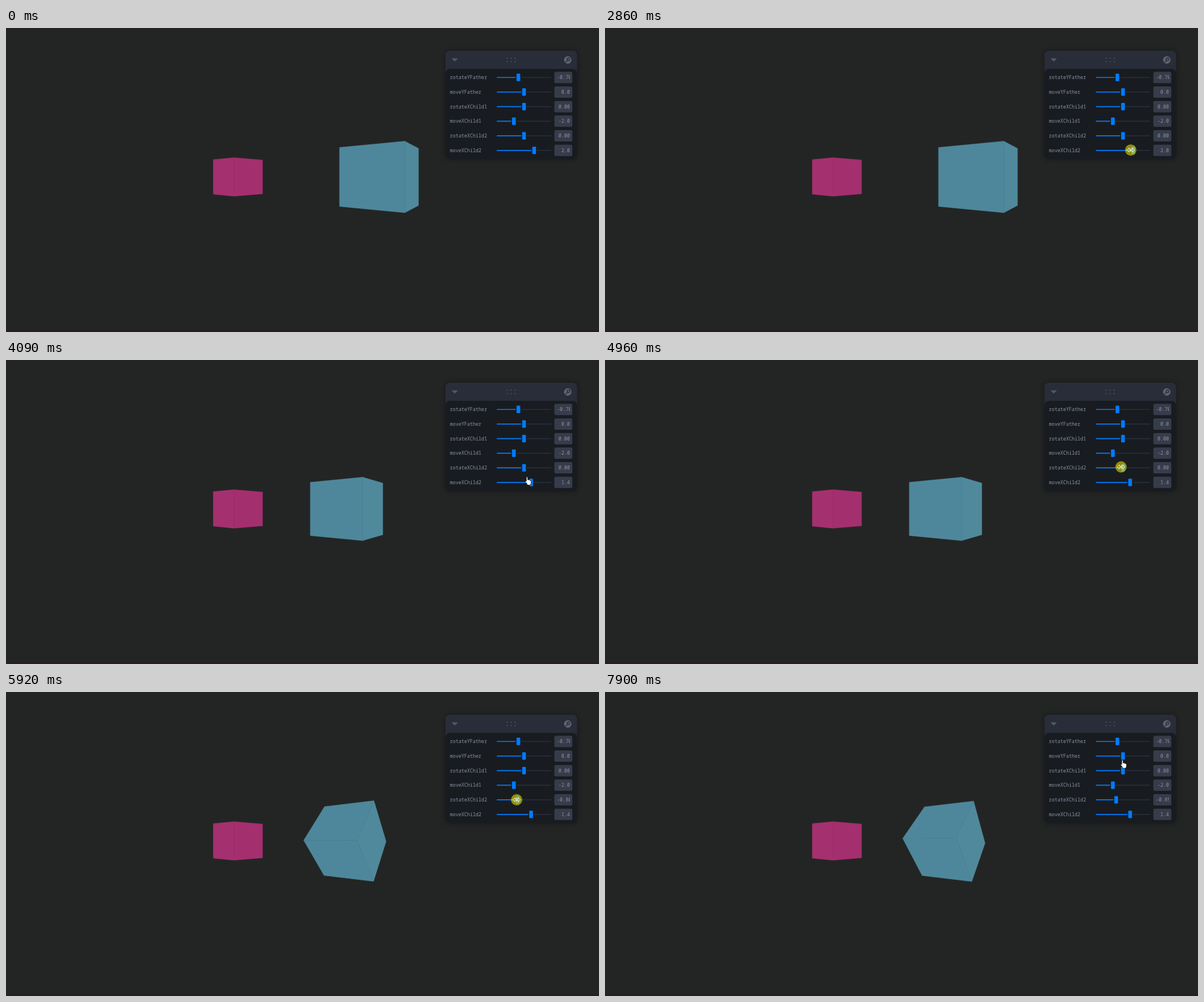
Animation of 1044x536 px, one loop 8000 ms. Source, as an HTML page:

```html
<!DOCTYPE html>
<html lang="en">
<head>
<meta charset="utf-8">
<title>Nested cubes with sliders</title>
<style>
  html, body { margin: 0; width: 100%; height: 100%; overflow: hidden; background: #232524; }
  svg { display: block; width: 1044px; height: 536px; }
  text { font: 8.38px "Noto Sans Mono", "DejaVu Sans Mono", monospace; fill: #8c92a4; white-space: pre; }
  .panel { filter: drop-shadow(0 0 4px rgba(0, 0, 0, .4)); }
  .head { fill: #292d39; }
  .body { fill: #181c20; }
  .field { fill: #373c4b; }
  .track { fill: #292d39; }
  .fill { fill: #007bff; }
  .thumb { fill: #007bff; stroke: #181c20; stroke-width: 3.3; paint-order: stroke; }
  .icon { fill: #535760; }
  .pointer { fill: #fff; stroke: #111; stroke-width: .8; stroke-linejoin: round; }
</style>
</head>
<body>
<svg id="stage" viewBox="0 0 1044 536">
  <rect width="1044" height="536" fill="#232524"/>
  <rect y="533" width="1044" height="3" fill="#2a1c20"/>
  <g id="cubes" stroke-width=".4" stroke-linejoin="round"></g>
  <g class="panel">
    <rect class="head" x="773.5" y="40" width="232" height="60" rx="8"/>
    <rect class="body" x="773.5" y="72" width="232" height="159" rx="8"/>
  </g>
  <path class="icon" d="M785.2 53.6h9.6q.6.4 0 1l-4.2 4.2q-.6.5-1.2 0l-4.2-4.2q-.6-.6 0-1z"/>
  <path d="M882.5 53.3h14.1M882.5 59.2h14.1" stroke="#535760" stroke-width="2.1"
        stroke-linecap="round" stroke-dasharray="0 7"/>
  <circle cx="989" cy="56.3" r="6.6" fill="#5f636b"/>
  <g fill="none" stroke="#292d39" stroke-width="1.4" stroke-linecap="round">
    <circle cx="990.3" cy="55" r="2.3"/>
    <path d="M988.4 57l-3 3.2"/>
  </g>
  <g id="rows"></g>
  <g id="cursor">
    <path id="arrow" class="pointer" d="M.4.4v11.2l2.6-2.4 1.7 3.6 1.6-.7-1.6-3.5h3.6z"/>
    <path id="hand" class="pointer" d="M-1.2 1.2q0-1.2 1.1-1.2t1.2 1.2v3.9q1.3-.5 2 .5 1.300-.5 2 .6 2-.3 2 1.500v3q0 1.600-1.100 2.500v1.300h-5.600v-1.300l-3.300-4.500q-.4-1.200.6-1.400.6 0 1.100.7z"/>
    <g id="drag">
      <circle r="10" fill="#e1d700" fill-opacity=".6"/>
      <path d="M-7 0l4-3.700v2.500h6v-2.500l4 3.700-4 3.700v-2.500h-6v2.500zM0-3v6" fill="none"
            stroke="#fffbe0" stroke-width=".9" stroke-linejoin="round"/>
    </g>
  </g>
</svg>
<script>
const LOOP = 8000;
const $ = id => document.getElementById(id);

function add(parent, tag, attrs, text) {
  const el = document.createElementNS('http://www.w3.org/2000/svg', tag);
  for (const key in attrs) el.setAttribute(key, attrs[key]);
  if (text) el.textContent = text;
  parent.appendChild(el);
  return el;
}

// Share of a move done at time t, in n hard steps; the first falls on t0, the last on t1.
function steps(t, t0, t1, n) {
  if (t < t0) return 0;
  if (n === 1 || t >= t1) return 1;
  return (Math.floor((t - t0) / (t1 - t0) * (n - 1) + 1e-6) + 1) / n;
}

/* Sliders */

function slider(name, index, range, digits) {
  const y = 87.2 + index * 25.72;
  const rows = $('rows');
  add(rows, 'text', { x: 781.6, y: y + 2.9 }, name);
  add(rows, 'rect', { class: 'track', x: 864, y: y - .8, width: 96, height: 1.7, rx: .8 });
  const fill = add(rows, 'rect', { class: 'fill', x: 864, y: y - .8, height: 1.7, rx: .8 });
  const thumb = add(rows, 'rect', { class: 'thumb', y: y - 6.6, width: 6.6, height: 13.2, rx: 1.4 });
  add(rows, 'rect', { class: 'field', x: 965.5, y: y - 10, width: 31.5, height: 20, rx: 2.5 });
  const clip = add(rows, 'svg', { x: 969.5, y: y - 10, width: 23.6, height: 20 });
  const label = add(clip, 'text', { y: 12.9 });
  return value => {
    const x = 912 + value / range * 44.7;
    const text = value.toFixed(digits).replace(/^-(0\.?0*)$/, '$1');
    const fits = text.length < 5;
    fill.setAttribute('width', x - 864);
    thumb.setAttribute('x', x - 3.3);
    label.setAttribute('x', fits ? 23.4 : .6);
    label.setAttribute('text-anchor', fits ? 'end' : 'start');
    label.textContent = text;
  };
}

const setters = ['Father', 'Child1', 'Child2'].flatMap((who, i) => {
  const axis = i ? 'X' : 'Y';
  return [
    slider('rotate' + axis + who, i * 2, Math.PI, 2),
    slider('move' + axis + who, i * 2 + 1, 5, 1)
  ];
});

/* Cubes: a turned parent holds two children, seen in perspective */

const VIEW = { x: 501.2, y: 262.6, focal: 380, depth: 5 };
const TURN = -0.7;

function project([x, y, z], shift, tilt) {
  const cy = y * Math.cos(tilt) - z * Math.sin(tilt);
  const cz = y * Math.sin(tilt) + z * Math.cos(tilt);
  const cx = x + shift;
  const wx = cx * Math.cos(TURN) + cz * Math.sin(TURN);
  const wz = cz * Math.cos(TURN) - cx * Math.sin(TURN);
  const k = VIEW.focal / (VIEW.depth - wz);
  return [VIEW.x + wx * k, VIEW.y - cy * k];
}

const FACES = [];
for (let axis = 0; axis < 3; axis++) {
  for (const side of [.5, -.5]) {
    FACES.push([[-1, -1], [1, -1], [1, 1], [-1, 1]].map(([u, v]) => {
      const p = [0, 0, 0];
      p[axis] = side;
      p[(axis + 1) % 3] = u * side;
      p[(axis + 2) % 3] = v / 2;
      return p;
    }));
  }
}

function cube(colors) {
  const paths = FACES.map((_, i) => {
    const color = colors[i >> 1];
    return add($('cubes'), 'path', { fill: color, stroke: color });
  });
  return (shift, tilt) => FACES.forEach((face, i) => {
    const pts = face.map(p => project(p, shift, tilt));
    const area = pts.reduce((sum, [x, y], j) => {
      const [nx, ny] = pts[(j + 1) % 4];
      return sum + x * ny - nx * y;
    }, 0);
    paths[i].setAttribute('d', area < 0 ? 'M' + pts.join('L') + 'Z' : '');
  });
}

const pink = cube(['#a42f6f', '#a42f6f', '#a5306f']);
const blue = cube(['#50899c', '#4e879b', '#4e879b']);

/* Cursor: start, end, steps, target x, target y, new shape */

const MOVES = [
  [250, 470, 4, 877, 253, 'arrow'],
  [790, 1330, 9, 917, 222],
  [1400, 1470, 2, 926, 214.500, 'hand'],
  [1600, 1600, 1, 926, 209],
  [1670, 1670, 1, 926, 214.5],
  [2000, 2000, 1, 926.5, 215, 'drag'],
  [2860, 3220, 6, 921, 216],
  [3420, 3420, 1, 921, 217],
  [3620, 3620, 1, 921, 217, 'hand'],
  [3950, 4360, 6, 910, 184],
  [4430, 4430, 1, 910, 188],
  [4690, 4690, 1, 910, 188, 'drag'],
  [4960, 4960, 1, 908.5, 188.5],
  [5035, 5710, 10, 901.5, 190],
  [5780, 5920, 3, 899, 190],
  [6190, 6260, 2, 898.5, 190],
  [6330, 6330, 1, 898, 189, 'hand'],
  [6730, 7100, 6, 885, 160],
  [7170, 7510, 6, 905, 129],
  [7580, 7900, 6, 911, 120]
];

function moveCursor(t) {
  let x = 1020, y = 598, shape = '';
  for (const [t0, t1, n, tx, ty, next] of MOVES) {
    if (t < t0) break;
    const k = steps(t, t0, t1, n);
    x += (tx - x) * k;
    y += (ty - y) * k;
    shape = next || shape;
  }
  $('cursor').setAttribute('transform', `translate(${x} ${y})`);
  for (const id of ['arrow', 'hand', 'drag']) {
    $(id).style.display = id === shape ? '' : 'none';
  }
}

function draw(t) {
  const shift = Math.round(20 - 6 * steps(t, 2930, 3220, 5)) / 10;
  const tilt = -.62 * steps(t, 5035, 5710, 10)
    - .18 * steps(t, 5780, 5920, 3)
    - .05 * steps(t, 6190, 6260, 2);
  [TURN, 0, 0, -2, tilt, shift].forEach((value, i) => setters[i](value));
  pink(-2, 0);
  blue(shift, tilt);
  moveCursor(t);
}

const begin = performance.now();
function frame() {
  draw((performance.now() - begin) % LOOP);
  requestAnimationFrame(frame);
}
frame();
</script>
</body>
</html>
```
